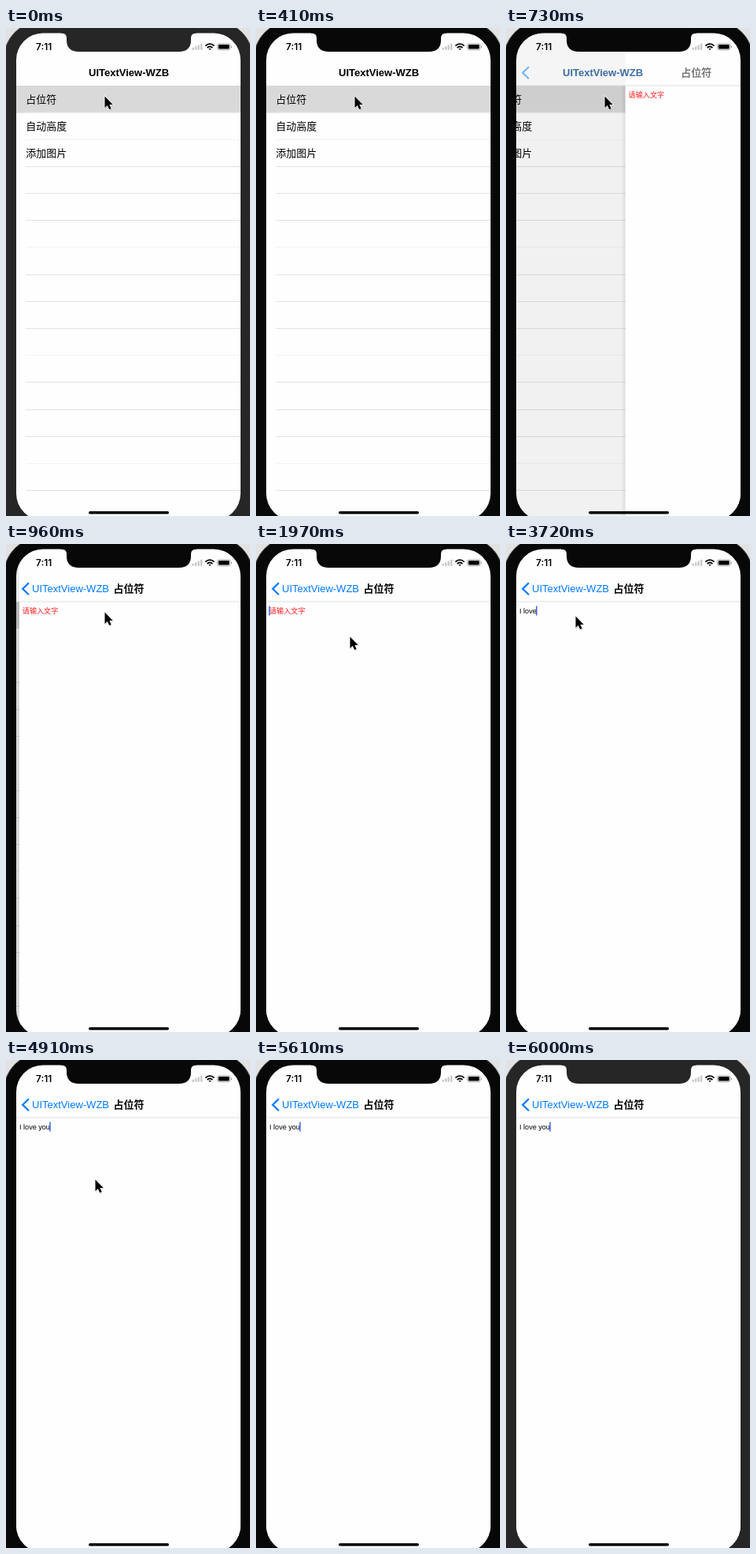
An HTML page that plays this animation: 310x618 px, repeating every 6.1 s.

```html
<!DOCTYPE html>
<html lang="zh-CN">
<head>
<meta charset="utf-8">
<title>UITextView-WZB</title>
<style>
  html, body { margin: 0; width: 100%; height: 100%; overflow: hidden; background: #e2e2e2; }
  svg { display: block; width: 310px; height: 618px; }
  text { white-space: pre; font-family: "Liberation Sans", sans-serif; }
  .zh { font-family: "Noto Sans CJK SC", "Noto Sans CJK", sans-serif; }
  .nav, .row { font-size: 13px; }
  .bold { font-weight: 700; }
  .small { font-size: 9.1px; }
  .time { font: 600 11.8px Inter, sans-serif; }
</style>
</head>
<body>
<svg viewBox="0 0 310 618">
  <defs>
    <clipPath id="screen"><rect x="13" y="6.5" width="285" height="617" rx="34"/></clipPath>
    <clipPath id="body"><rect x="13" y="73" width="285" height="551"/></clipPath>
    <linearGradient id="edge">
      <stop offset="0" stop-opacity="0"/>
      <stop offset="1" stop-opacity=".1"/>
    </linearGradient>
  </defs>

  <rect class="bezel" x="-3" y="-9" width="317" height="660" rx="49" stroke="#555"/>

  <g clip-path="url(#screen)">
    <rect x="13" y="6" width="285" height="618" fill="#fefefe"/>

    <g clip-path="url(#body)">
      <g id="list">
        <rect x="13" y="73" width="285" height="34.5" fill="#d9d9d9"/>
        <g id="rows"></g>
      </g>
      <rect id="dim" x="13" y="73" width="285" height="551"/>
      <g id="page">
        <rect x="-5" y="73" width="5" height="551" fill="url(#edge)"/>
        <rect y="73" width="286" height="551" fill="#fefefe"/>
        <text id="hint" class="zh small" x="4" y="88" fill="#ff1a1a">请输入文字</text>
        <text id="typed" class="small" x="4" y="88"></text>
        <rect id="caret" y="78.5" width="1.5" height="12" fill="#3f63e6"/>
      </g>
    </g>

    <rect id="navDim" x="13" y="6" height="67"/>
    <rect id="hair" x="13" y="72.6" width="285" height=".8" fill="#d8d8d8"/>
    <path id="back" d="M29 49.2L21.2 56.7L29 64.2" fill="none" stroke="#007aff" stroke-width="2.2"/>
    <text id="backTitle" class="nav" y="61">UITextView-WZB</text>
    <text id="newTitle" class="zh nav bold" y="61.3">占位符</text>

    <text class="time" x="38" y="28">7:11</text>
    <g id="signal" fill="#c9c9c9"></g>
    <g fill="none" stroke="#000" stroke-width="1.8">
      <path d="M253.4 22.6Q259 17.6 264.6 22.6M255.6 25Q259 22 262.4 25"/>
      <path d="M257.3 26L259 28L260.7 26Z" fill="#000" stroke="none"/>
    </g>
    <rect x="268.5" y="19.8" width="16.4" height="8" rx="2.2" fill="none" stroke="#a5a5a5" stroke-width=".9"/>
    <rect x="269.8" y="21" width="13.8" height="5.6" rx="1.1"/>
    <rect x="285.8" y="22.4" width="1.2" height="2.8" rx=".6" fill="#a5a5a5"/>
    <rect x="105" y="612" width="102" height="3.5" rx="1.75"/>
  </g>

  <path class="bezel" d="M70 5.5H242V6.5Q235 6.5 235 12.5V15Q235 30 219.5 30H92.5Q77 30 77 15V12.5Q77 6.5 70 6.5Z"/>

  <g id="cursor">
    <path d="M.5 1.5V16L4 13L6.3 18L9 17L6.8 12H11.5Z" opacity=".18"/>
    <path d="M0 0V14.4L3.3 11.4L5.6 16.6L8.2 15.4L5.9 10.4H10.3Z" stroke="#fff" stroke-width="1.5" paint-order="stroke"/>
  </g>
</svg>
<script>
const LOOP = 6100, TICK = 70, FOCUS = 1550;
const PHRASE = "I love you";
const keyTimes = [2890, 2950, 3310, 3480, 3540, 3720, 4020, 4200, 4320, 4500];

// Where the pointer rests and turns: time, x, y
const pointer = [
  [1050, 125.5, 86.5], [1270, 119.5, 117.5],
  [1970, 119.5, 117.5], [2250, 88.5, 91.5],
  [4200, 88.5, 91.5], [4500, 87, 75],
  [4840, 87, 75], [4910, 113.5, 151.5], [5120, 194, 441], [5190, 220, 640]
];

const $ = id => document.getElementById(id);
const clamp = v => Math.min(1, Math.max(0, v));
const mix = (a, b, u) => a + (b - a) * u;

function set(target, attrs) {
  const node = typeof target === "string" ? $(target) : target;
  for (const k in attrs) node.setAttribute(k, attrs[k]);
}

function add(parent, tag, attrs, content = "") {
  const node = document.createElementNS("http://www.w3.org/2000/svg", tag);
  set(node, attrs);
  node.textContent = content;
  $(parent).append(node);
}

for (let k = 1; k < 16; k++) {
  add("rows", "rect", {
    x: 25, y: Math.floor(72.6 + 34.2 * k), width: 273, height: 1,
    fill: "#e2e2e2", opacity: k % 4 === 2 ? .4 : 1
  });
}
["占位符", "自动高度", "添加图片"].forEach((label, k) =>
  add("rows", "text", { class: "zh row", x: 25.2, y: 95 + 34.2 * k }, label));

for (let k = 0; k < 4; k++) {
  const h = 3 + 1.65 * k;
  add("signal", "rect", { x: 236.5 + 3.5 * k, y: 27.8 - h, width: 2.4, height: h, rx: .5 });
}

const bezels = document.querySelectorAll(".bezel");

// Critically damped spring: share of the push still to go
function remaining(t) {
  const s = Math.max(0, t - 631) * .0218;
  const r = (1 + s) * Math.exp(-s);
  return t < 640 ? 1 : r < .002 ? 0 : r;
}

function pointerAt(t) {
  const i = pointer.findIndex(p => p[0] > t);
  if (i === 0) return pointer[0].slice(1);
  if (i < 0) return pointer.at(-1).slice(1);
  const [t0, x0, y0] = pointer[i - 1], [t1, x1, y1] = pointer[i];
  const u = (t - t0) / (t1 - t0);
  return [mix(x0, x1, u), mix(y0, y1, u)];
}

// Solid after focus or a key, then off and on again
function caretAlpha(t, count) {
  const age = t - (count ? keyTimes[count - 1] : FOCUS);
  return age < 0 ? 0 : clamp((700 - age) / 80) + clamp((age - 1020) / 80);
}

function draw(t) {
  const held = t - (t - 10) % TICK;

  const active = t >= 410 && t < 6000;
  bezels.forEach(b => set(b, { fill: active ? "#080808" : "#262626" }));

  const r = remaining(held), p = 1 - r;
  const left = mix(13, 298, r);
  set("list", { transform: `translate(${-85.5 * p})` });
  set("page", { transform: `translate(${left})`, visibility: p ? "visible" : "hidden" });
  set("dim", { opacity: .1 * p });
  set("navDim", { width: left - 13, opacity: .07 * p });
  set("hair", { opacity: p ? 1 : 0 });

  // The bar settles slightly ahead of the page
  const n = clamp((r - .02) / .98), q = 1 - n;
  set("back", { opacity: q });
  set("backTitle", {
    x: Math.min(105, 33 + 82 * n),
    fill: `rgb(0 ${122 * q} ${255 * q})`,
    opacity: 1 - n * q,
    "font-weight": n > .3 ? 700 : 400
  });
  set("newTitle", { x: 136.5 + 180 * n, opacity: q });

  const count = keyTimes.filter(k => k <= t).length;
  $("typed").textContent = PHRASE.slice(0, count);
  set("hint", { opacity: count ? 0 : 1 });
  set("caret", {
    x: 3.3 + (count ? $("typed").getComputedTextLength() : 0),
    opacity: caretAlpha(t, count)
  });

  set("cursor", { transform: `translate(${pointerAt(held)})` });
}

const start = performance.now();
function tick() {
  draw((performance.now() - start) % LOOP);
  requestAnimationFrame(tick);
}
tick();
</script>
</body>
</html>
```
